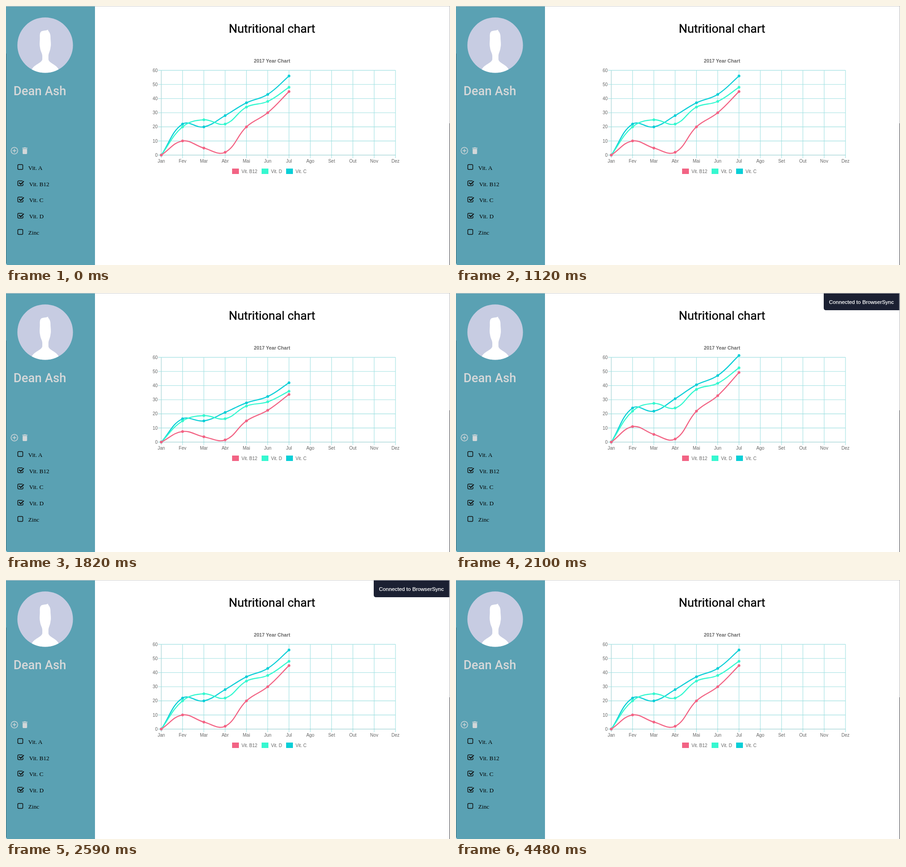
Recreate the animation shown at these times as an HTML page. Size 978 by 572 pixels, loop 4550 ms.

```html
<!DOCTYPE html>
<html lang="en">
<head>
<meta charset="utf-8">
<title>Nutritional chart</title>
<style>
  html, body { margin: 0; width: 100%; height: 100%; overflow: hidden; background: #fff; }
  svg { display: block; }
  .sans { font-family: "Liberation Sans", Arial, sans-serif; font-size: 10px; fill: #666; }
  .serif { font-family: "Liberation Serif", Times, serif; font-size: 13.1px; }
  .head { font-family: Roboto, sans-serif; }
</style>
</head>
<body>
<svg id="stage" width="978" height="572" viewBox="0 0 978 572">
  <defs><clipPath id="round"><circle cx="86.3" cy="86.4" r="61.2"/></clipPath></defs>

  <!-- sidebar -->
  <path d="M0 0H196V572H4Q0 572 0 568Z" fill="#5aa1b3"/>
  <g clip-path="url(#round)">
    <rect x="25" y="25" width="123" height="123" fill="#c7cce2"/>
    <path fill="#fff" d="M78 56C82 54 88 55 92.5 52.3C92 56 98 57 98 68C98 77 100 84 98 92
      C97 101 93.500 104 93.500 111V118C95 127 111 128 117 142V150H56V142C62 128 78 127 80 118V111
      C80 104 76 101 75 92C73 84 75 77 74.500 68C74.500 62 75 58 78 56Z"/>
  </g>
  <text class="head" x="16.500" y="197" font-size="27.2" font-weight="500" fill="#d6d8d9">Dean Ash</text>
  <g fill="none" stroke="#d3d7d9" stroke-width="1.5">
    <circle cx="18.500" cy="319.500" r="7.300"/>
    <path d="M14.500 319.500H22.500M18.500 315.500V323.500"/>
  </g>
  <path fill="#d3d7d9" transform="translate(31.7 309.700) scale(.82)"
    d="M6 19c0 1.1.9 2 2 2h8c1.1 0 2-.9 2-2V7H6zM19 4h-3.500l-1-1h-5l-1 1H5v2h14z"/>
  <g id="list"></g>

  <!-- chart -->
  <text class="head" x="586" y="58.800" font-size="26.4" text-anchor="middle" stroke="#000" stroke-width=".3">Nutritional chart</text>
  <text class="sans" x="586" y="124.700" style="font-size:10.7px" font-weight="700" text-anchor="middle">2017 Year Chart</text>
  <g id="grid"></g>
  <g id="plot"></g>
  <g id="legend"></g>

  <!-- window edges -->
  <path d="M0 .5H978" stroke="#cfcfcf"/>
  <path d="M.5 105V568" stroke="#3d6e7c"/>
  <path d="M977.500 0V259" stroke="#b5b5b8"/>
  <path d="M977.500 259V572" stroke="#34343c"/>

  <g id="toast">
    <path d="M810 1H976.500V38H815Q810 38 810 33Z" fill="#1b2032"/>
    <text class="sans" x="821.500" y="24" style="font-size:11.8px;fill:#fff" stroke="#fff" stroke-width=".25">Connected to BrowserSync</text>
  </g>
</svg>
<script>
const $ = id => document.getElementById(id);
const LOOP = 4550, STEP = 70;
const RELOAD = 1623, GROW = 900, TOAST_ON = 1960, TOAST_OFF = 3990;
const LEFT = 342, BASE = 329.3, DX = 46.9, UNIT = 3.12;

function add(parent, tag, attrs, text = "") {
  const el = document.createElementNS("http://www.w3.org/2000/svg", tag);
  for (const key in attrs) el.setAttribute(key, attrs[key]);
  el.textContent = text;
  return parent.appendChild(el);
}

// Checklist
[["Vit. A", 0], ["Vit. B12", 1], ["Vit. C", 1], ["Vit. D", 1], ["Zinc", 0]].forEach(([name, on], i) => {
  const y = 355.5 + i * 35.85;
  const pen = { fill: "none", stroke: "#111", "stroke-width": 1.5 };
  if (on) {
    add($("list"), "path", { ...pen, d: `M36.500 ${y - 5.2}H28Q26 ${y - 5.2} 26 ${y - 3.2}V${y + 3.5}Q26 ${y + 5.5} 28 ${y + 5.5}H35.500Q37.500 ${y + 5.5} 37.500 ${y + 3.5}V${y + 1}` });
    add($("list"), "path", { ...pen, "stroke-width": 2.3, d: `M28.800 ${y - 1.2}L32.500 ${y + 2.3}L39.200 ${y - 4.3}` });
  } else {
    add($("list"), "rect", { ...pen, x: 26, y: y - 5.3, width: 11, height: 10.8, rx: 2 });
  }
  add($("list"), "text", { class: "serif", x: on ? 51 : 49, y: y + 6.2 }, name);
});

// Grid and axis labels
const line = (d, stroke = "#9fe0e1") => add($("grid"), "path", { d, stroke, "stroke-width": 1.1 });
const label = (x, y, anchor, text) => add($("grid"), "text", { class: "sans", x, y, "text-anchor": anchor }, text);
"Jan Fev Mar Abr Mai Jun Jul Ago Set Out Nov Dez".split(" ").forEach((month, i) => {
  const x = LEFT + i * DX;
  line(`M${x} 142V336`, i ? undefined : "#9accce");
  label(x, 346.4, "middle", month);
});
for (let v = 0; v <= 60; v += 10) {
  const y = BASE - v * UNIT;
  line(`M335 ${y}H858`, v ? undefined : "#86c5c8");
  label(334, y + 3.4, "end", v);
}

// Smooth curve through the points, tension 0.4
function curve(pts) {
  const handles = pts.map((p, i) => {
    const a = pts[i - 1] || p, b = pts[i + 1] || p;
    const before = Math.hypot(p[0] - a[0], p[1] - a[1]);
    const after = Math.hypot(b[0] - p[0], b[1] - p[1]);
    const f = 0.4 / (before + after);
    const shift = k => [p[0] + k * (b[0] - a[0]), p[1] + k * (b[1] - a[1])];
    return [shift(-f * before), shift(f * after)];
  });
  return "M" + pts[0] + pts.slice(1).map((p, i) => `C${handles[i][1]} ${handles[i + 1][0]} ${p}`).join("");
}

const series = [
  { name: "Vit. C", color: "#0acfd7", x: 617, data: [0, 22, 20, 28, 37, 43, 56] },
  { name: "Vit. D", color: "#35f8d0", x: 563, data: [0, 20, 25, 22, 34, 38, 48] },
  { name: "Vit. B12", color: "#f26384", x: 498, data: [0, 10, 5, 2, 20, 30, 45] }
];
for (const s of series) {
  s.path = add($("plot"), "path", { fill: "none", stroke: s.color, "stroke-width": 2.4 });
  s.dots = s.data.map((v, i) => add($("plot"), "circle", { cx: LEFT + i * DX, r: 3, fill: s.color }));
  add($("legend"), "rect", { x: s.x, y: 359, width: 15, height: 12, fill: s.color });
  add($("legend"), "text", { class: "sans", x: s.x + 20.8, y: 369 }, s.name);
}
// Handles come from the full-size curve, so the whole shape scales from the base line.
for (const s of series) {
  s.full = curve(s.data.map((v, i) => [LEFT + i * DX, -v * UNIT]));
  s.path.setAttribute("d", s.full);
  s.path.setAttribute("vector-effect", "non-scaling-stroke");
}

function easeOutBack(t) {
  const u = t - 1, s = 1.70158;
  return 1 + u * u * ((s + 1) * u + s);
}

function draw(now) {
  const t = Math.floor(now % LOOP / STEP) * STEP;
  const grow = t < RELOAD ? 1 : easeOutBack(Math.min(1, (t - RELOAD) / GROW));
  for (const s of series) {
    s.path.setAttribute("transform", `translate(0 ${BASE}) scale(1 ${grow})`);
    s.dots.forEach((dot, i) => dot.setAttribute("cy", BASE - s.data[i] * UNIT * grow));
  }
  $("toast").style.display = t >= TOAST_ON && t < TOAST_OFF ? "" : "none";
}

let start;
function tick(now) {
  start ??= now;
  draw(now - start);
  requestAnimationFrame(tick);
}
draw(0);
requestAnimationFrame(tick);
</script>
</body>
</html>
```
